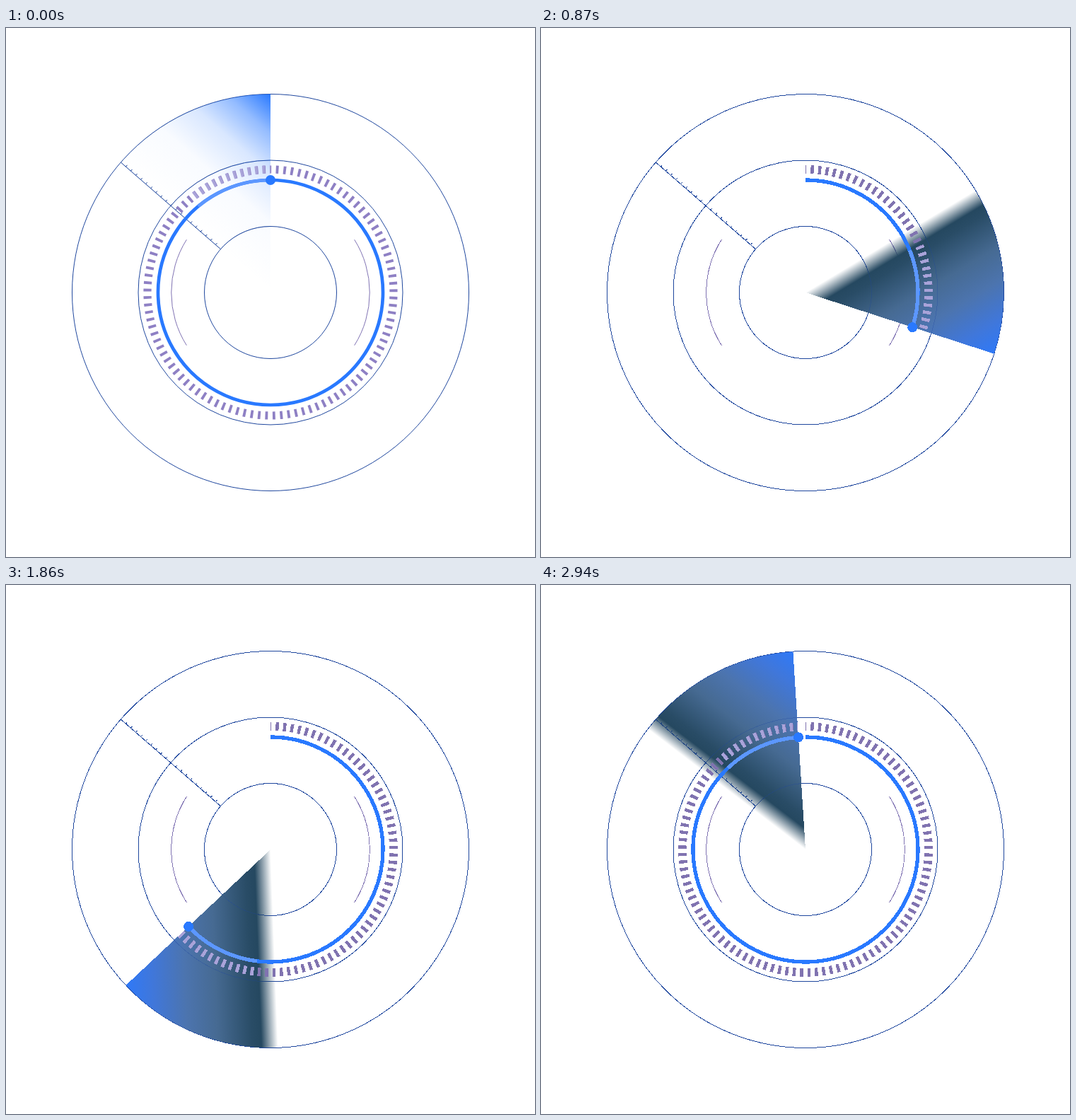
These frames come from a looping animation (748 by 748 pixels, 2.97 s). An HTML page:

```html
<!DOCTYPE html>
<html lang="en">
<head>
<meta charset="utf-8">
<title>Radar sweep</title>
<style>
  html, body { margin: 0; width: 100%; height: 100%; overflow: hidden; background: #fff; }
  svg { display: block; width: 100%; height: 100%; }
</style>
</head>
<body>
<svg id="stage" viewBox="-374 -374 748 748" fill="none">
  <defs>
    <linearGradient id="dark" gradientUnits="userSpaceOnUse">
      <stop offset="0" stop-color="#254860" stop-opacity="0"/>
      <stop offset=".11" stop-color="#254860"/>
      <stop offset=".17" stop-color="#294c66"/>
      <stop offset=".4" stop-color="#466a92"/>
      <stop offset=".6" stop-color="#4c74ae"/>
      <stop offset=".82" stop-color="#4077da"/>
      <stop offset="1" stop-color="#2f79f8"/>
    </linearGradient>
    <linearGradient id="pale" gradientUnits="userSpaceOnUse">
      <stop offset="0" stop-color="#2979ff" stop-opacity="0"/>
      <stop offset=".35" stop-color="#2979ff" stop-opacity=".03"/>
      <stop offset=".6" stop-color="#2979ff" stop-opacity=".18"/>
      <stop offset=".8" stop-color="#2979ff" stop-opacity=".5"/>
      <stop offset="1" stop-color="#2979ff"/>
    </linearGradient>
    <clipPath id="inside"><path id="clip"/></clipPath>
  </defs>
  <g id="grid" stroke="#1f479e">
    <circle r="93.5"/><circle r="187"/><circle r="280.5"/>
    <path id="ruler"/>
  </g>
  <path id="sides" stroke="#8073b3"/>
  <path id="wedge"/>
  <g clip-path="url(#inside)" opacity=".3"><use href="#grid"/></g>
  <path id="ticks"/>
  <path id="litTicks" stroke="#a9a3d9"/>
  <path id="ring" stroke="#2979ff"/>
  <path id="litRing" stroke="#5c97ff"/>
  <circle id="dot" r="7" fill="#2979ff"/>
</svg>
<script>
const FRAME = 30, COUNT = 99, SPAN = 49;
const OUTER = 280.5, RING = 159, TICK = 174, SIDE = 140.25;
const PERIOD = 10.425, FIRST_TICK = 9.7;
const start = performance.now();
const el = id => document.getElementById(id);
const rad = deg => deg * Math.PI / 180;

function set(id, attrs) {
  for (const name in attrs) el(id).setAttribute(name, attrs[name]);
}

// Angles run clockwise from the top.
function polar(r, deg) {
  return [r * Math.sin(rad(deg)), -r * Math.cos(rad(deg))];
}

function arc(r, from, to) {
  const end = Math.min(to, from + 359.99);
  return `M${polar(r, from)}A${r} ${r} 0 ${end - from > 180 ? 1 : 0} 1 ${polar(r, end)}`;
}

function sweepAngle(step) {
  if (step <= 11) return step * 41.1 / 11;
  if (step <= 18) return 41.1 + (step - 11) * 3.9;
  return 3.6 * (step + 1);
}

function tickArc(id, from, to, dash, width) {
  set(id, {
    d: arc(TICK, from, to),
    'stroke-width': width,
    'stroke-dasharray': `${dash} ${PERIOD - dash}`,
    'stroke-dashoffset': PERIOD - FIRST_TICK + dash / 2 + rad(from) * TICK
  });
}

function drawStatic() {
  let ruler = `M${polar(OUTER, -SPAN)}L${polar(93.5, -SPAN)}`;
  const [nx, ny] = polar(3, 90 - SPAN);
  for (let i = 1; i < 20; i++) {
    ruler += `M${polar(OUTER - i * 9.35, -SPAN)}l${nx} ${ny}`;
  }
  set('ruler', { d: ruler });
  set('sides', { d: arc(SIDE, 57.8, 122.2) + arc(SIDE, 237.8, 302.2) });
  const [x2, y2] = polar(OUTER * Math.sin(rad(SPAN)), 90 - SPAN);
  for (const id of ['dark', 'pale']) set(id, { x1: 0, y1: 0, x2, y2 });
}

function draw(time) {
  const step = Math.floor(time / FRAME) % COUNT;
  const resting = step === 0;
  const lead = resting ? 360 : sweepAngle(step);
  const paint = resting ? 'pale' : 'dark';
  const sector = arc(OUTER, lead - SPAN, lead) + 'L0 0Z';
  const lit = Math.max(0, lead - 40);
  const [cx, cy] = polar(RING, lead);
  // The moving sweep has hard-edged, slightly heavier lines.
  const extra = resting ? 0 : 0.6;
  const dash = 3.8 + extra, tickWidth = 11.2 + extra, ringWidth = 4.7 + extra;

  set('stage', { 'shape-rendering': resting ? 'auto' : 'crispEdges' });
  set(paint, { gradientTransform: `rotate(${lead})` });
  set('wedge', { d: sector, fill: `url(#${paint})` });
  set('clip', { d: sector });
  set('ring', { d: arc(RING, 0, lead), 'stroke-width': ringWidth });
  set('litRing', { d: arc(RING, lit, lead), 'stroke-width': ringWidth });
  set('ticks', { stroke: resting ? '#8e80c4' : '#8073b0' });
  tickArc('ticks', 0, lead, dash, tickWidth);
  tickArc('litTicks', lit, lead, dash, tickWidth);
  set('dot', { cx, cy });
}

function loop() {
  draw(performance.now() - start);
  requestAnimationFrame(loop);
}

drawStatic();
loop();
</script>
</body>
</html>
```
